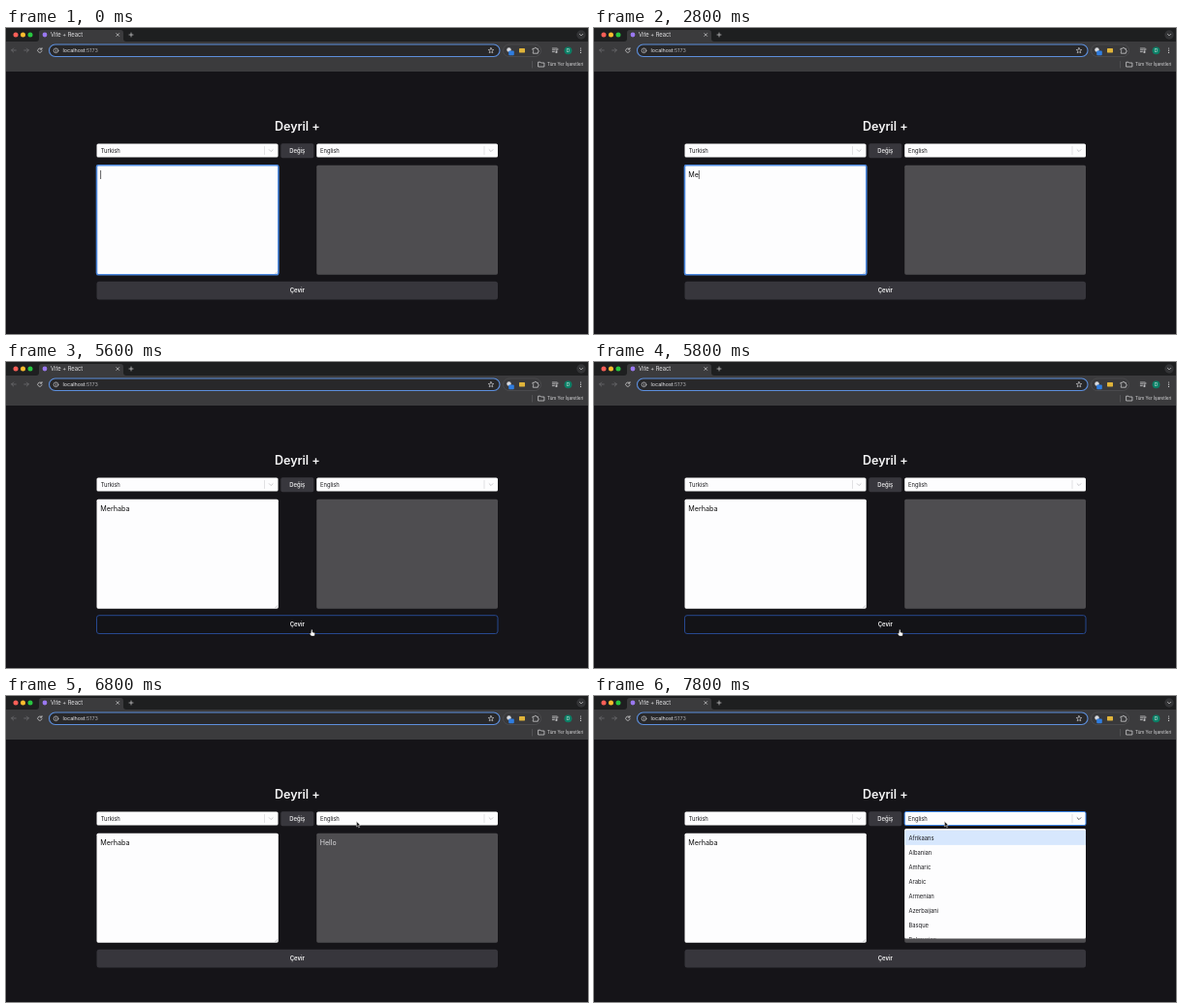
Write an HTML page that moves like this. It is 600 by 316 pixels and loops after 8 s.

```html
<!DOCTYPE html>
<html lang="tr">
<head>
<meta charset="utf-8">
<title>Vite + React</title>
<style>
  html, body { margin: 0; width: 100%; height: 100%; overflow: hidden; background: #151418; }
  svg { display: block; width: 600px; height: 316px; font-family: Inter, "Liberation Sans", sans-serif; }
  .line { fill: none; stroke-linecap: round; stroke-linejoin: round; }
  .mid { text-anchor: middle; }
  .field { font-size: 5.8px; fill: #1c1c1f; }
</style>
</head>
<body>
<svg viewBox="0 0 600 316">
  <!-- browser window -->
  <rect width="600" height="15" fill="#1e1f20"/>
  <rect y="14" width="600" height="31" fill="#3b3b3d"/>
  <path d="M31 14q3 0 3-3V5q0-3 3-3h81q3 0 3 3v6q0 3 3 3z" fill="#3b3b3d"/>
  <circle cx="10" cy="7" r="2.5" fill="#ff5f57"/>
  <circle cx="17.5" cy="7" r="2.5" fill="#febc2e"/>
  <circle cx="25" cy="7" r="2.5" fill="#28c840"/>
  <circle cx="40" cy="7" r="2.4" fill="#9a78f0"/>
  <text x="46" y="9" font-size="5.8" fill="#e4e4e6">Vite + React</text>
  <g class="line" stroke="#d4d4d6" stroke-width=".7">
    <path d="M113.8 5.6l2.8 2.8m0-2.8l-2.8 2.8M127 7h4m-2-2v4"/>
    <circle cx="593" cy="7" r="4.7" fill="#333436" stroke="none"/>
    <path d="M591.4 6.3l1.6 1.6 1.6-1.6"/>
    <path d="M10.3 23h-4.6m2-2l-2 2 2 2M18.7 23h4.6m-2-2l2 2-2 2" stroke="#737376"/>
    <path d="M36.6 21.7a2.2 2.2 0 1 0 .5 1.9M37 20.5v1.6h-1.7"/>
  </g>
  <rect x="44.5" y="17" width="464.5" height="12.5" rx="6.25" fill="#28282a" stroke="#5d8fdc" stroke-width="1.1"/>
  <g class="line" stroke="#d0d0d2" stroke-width=".65">
    <circle cx="51.5" cy="23.3" r="2.4"/>
    <path d="M51.5 23.2v1.2m0-2.4v.05"/>
    <path d="M500 20.5l.8 1.8 2 .2-1.5 1.3.5 2-1.8-1.1-1.8 1.1.5-2-1.5-1.3 2-.2z"/>
  </g>
  <text x="58.5" y="25.3" font-size="5.4" fill="#f0f0f2">localhost<tspan fill="#aeaeb2">:5173</tspan></text>
  <rect x="512.5" y="17" width="39" height="12.5" rx="6.25" fill="#39393b" stroke="#57575a" stroke-width=".6"/>
  <circle cx="518.5" cy="22.5" r="2.2" fill="#d8dade"/>
  <rect x="518.2" y="23.6" width="5.6" height="4.6" rx="1" fill="#2f7de0"/>
  <rect x="529" y="21" width="6" height="4.4" rx=".6" fill="#e0b43a"/>
  <g class="line" stroke="#d4d4d6" stroke-width=".75">
    <path d="M543.3 21.3h1.5a1 1 0 0 1 2 0h1.5v1.6a1 1 0 0 1 0 2v1.3h-5v-1.5a1 1 0 0 0 0-1.8z"/>
    <path d="M563.3 21h4.7m-4.7 1.8h3m-3 1.8h2m2.5.4v-3h1.3"/>
    <circle cx="567.2" cy="25" r=".6"/>
    <path d="M542.5 34.5v6.5" stroke="#606063" stroke-width=".6"/>
    <path d="M549 35.2h2l.7.8h3.2v4h-5.9z"/>
  </g>
  <circle cx="579.5" cy="23.3" r="3.9" fill="#0c8067"/>
  <text x="579.5" y="25" class="mid" font-size="4.4" fill="#fff">D</text>
  <g fill="#d8d8da"><circle cx="592.5" cy="21" r=".6"/><circle cx="592.5" cy="23.2" r=".6"/><circle cx="592.5" cy="25.4" r=".6"/></g>
  <text x="558" y="39.2" font-size="4.5" fill="#dadadc">Tüm Yer İşaretleri</text>

  <!-- page -->
  <rect y="45" width="600" height="271" fill="#151418"/>
  <text x="300.3" y="106" class="mid" font-size="12.5" font-weight="600" fill="#f7f7f8">Deyril +</text>
  <rect x="93.5" y="119.5" width="187" height="14" rx="1.6" fill="#fdfdfe"/>
  <rect id="target" x="320.2" y="119.5" width="186.8" height="14" rx="1.6" fill="#fdfdfe"/>
  <text x="97.7" y="128.7" class="field">Turkish</text>
  <text x="324" y="128.7" class="field">English</text>
  <g class="line" stroke="#c4c4c8" stroke-width=".5">
    <path d="M266.5 122.5v8M493 122.5v8"/>
    <path d="M271.3 125.7l1.9 1.9 1.9-1.9" stroke-width=".9"/>
    <path id="chevron" d="M498.1 125.7l1.9 1.9 1.9-1.9" stroke-width=".9"/>
  </g>
  <rect x="283.3" y="119.3" width="34" height="15" rx="1.8" fill="#38373d"/>
  <text x="300.2" y="128.8" class="mid" font-size="5.9" font-weight="500" fill="#f4f4f5">Değiş</text>

  <rect id="input" x="93.5" y="141.7" width="187.3" height="113" rx="1.6" fill="#fdfdfe"/>
  <path class="line" d="M277.6 253.6l2-2m-.8 2l.8-.8" stroke="#9a9a9e" stroke-width=".4"/>
  <text id="typed" x="97.3" y="154" font-size="7.2" fill="#111"></text>
  <path id="caret" d="M0 147v9" stroke="#222" stroke-width=".7"/>
  <rect x="320.2" y="141.7" width="186.8" height="113" rx="1.6" fill="#4e4d50"/>
  <text id="result" x="323.8" y="154" font-size="7" fill="#dcdcde">Hello</text>
  <rect id="submit" x="93.5" y="261.7" width="413.5" height="18.8" rx="2.5"/>
  <text x="300.3" y="272.8" class="mid" font-size="5.9" font-weight="600" fill="#fafafa">Çevir</text>

  <clipPath id="menuClip"><rect x="320.2" y="137" width="186.8" height="113.5" rx="1.6"/></clipPath>
  <g id="menu" clip-path="url(#menuClip)">
    <rect x="320" y="137" width="188" height="114" fill="#fdfdfe"/>
    <rect x="320" y="138.8" width="188" height="15.1" fill="#d7e7fd"/>
  </g>
  <path id="hand" d="M-.7 0q.7-.8 1.3 0v2.4l2 .5q.8.3.6 1.3l-.6 2.3h-3.3l-2-2.5q.3-1 1.4-.2z" fill="#fff" stroke="#111" stroke-width=".45"/>
  <path id="arrow" d="M0 0v5.4l1.3-1.1.9 2 .9-.4-.9-2h1.7z" fill="#111" stroke="#fff" stroke-width=".45"/>
</svg>
<script>
const LOOP = 8000;
const el = id => document.getElementById(id);
const [target, chevron, input, typed, caret, result, submit, menu, hand, arrow] =
  ["target", "chevron", "input", "typed", "caret", "result", "submit", "menu", "hand", "arrow"].map(el);

["Afrikaans", "Albanian", "Amharic", "Arabic", "Armenian", "Azerbaijani", "Basque", "Belarusian"].forEach((name, i) => {
  const option = document.createElementNS(menu.namespaceURI, "text");
  option.setAttribute("class", "field");
  option.setAttribute("x", 324.5);
  option.setAttribute("y", 148.6 + i * 15.08);
  option.textContent = name;
  menu.append(option);
});

const word = "Merhaba";
const keyTimes = [2400, 2800, 3000, 3200, 3600, 3800, 4200];
const caretToggles = [400, 800, 1400, 1800, 2200, 2400, 4600];
const handPath = [[4800, 318, 284], [5000, 316, 280], [5200, 315.4, 276.6]];
const arrowPath = [[6600, 349, 196], [6800, 361.4, 129.6]];

const passed = (times, t) => times.filter(time => time <= t).length;
const show = (node, on) => node.setAttribute("visibility", on ? "visible" : "hidden");
const outline = (node, color, width) => {
  node.setAttribute("stroke", color);
  node.setAttribute("stroke-width", width);
};

function place(node, path, t, end) {
  const step = path.filter(p => p[0] <= t).pop();
  show(node, step && t < end);
  if (step) node.setAttribute("transform", `translate(${step[1]} ${step[2]})`);
}

function render(t) {
  const typing = t < 5400;
  const hovered = t >= 5000 && t < 6600;
  const open = t >= 7200;

  typed.textContent = word.slice(0, passed(keyTimes, t));
  const caretX = 97.6 + typed.getComputedTextLength();
  caret.setAttribute("transform", `translate(${caretX} 0)`);
  show(caret, typing && passed(caretToggles, t) % 2 === 0);
  outline(input, typing ? "#4b87dd" : "none", 1.6);

  submit.setAttribute("fill", hovered ? "#131317" : "#37363c");
  outline(submit, hovered ? "#27488f" : "none", 1);
  show(result, t >= 6000);

  show(menu, open);
  outline(target, open ? "#3b86ee" : "none", 1);
  chevron.setAttribute("stroke", open ? "#555" : "#c4c4c8");
  place(hand, handPath, t, 6600);
  place(arrow, arrowPath, t, LOOP);
}

function tick() {
  render(performance.now() % LOOP);
  requestAnimationFrame(tick);
}
tick();
</script>
</body>
</html>
```
